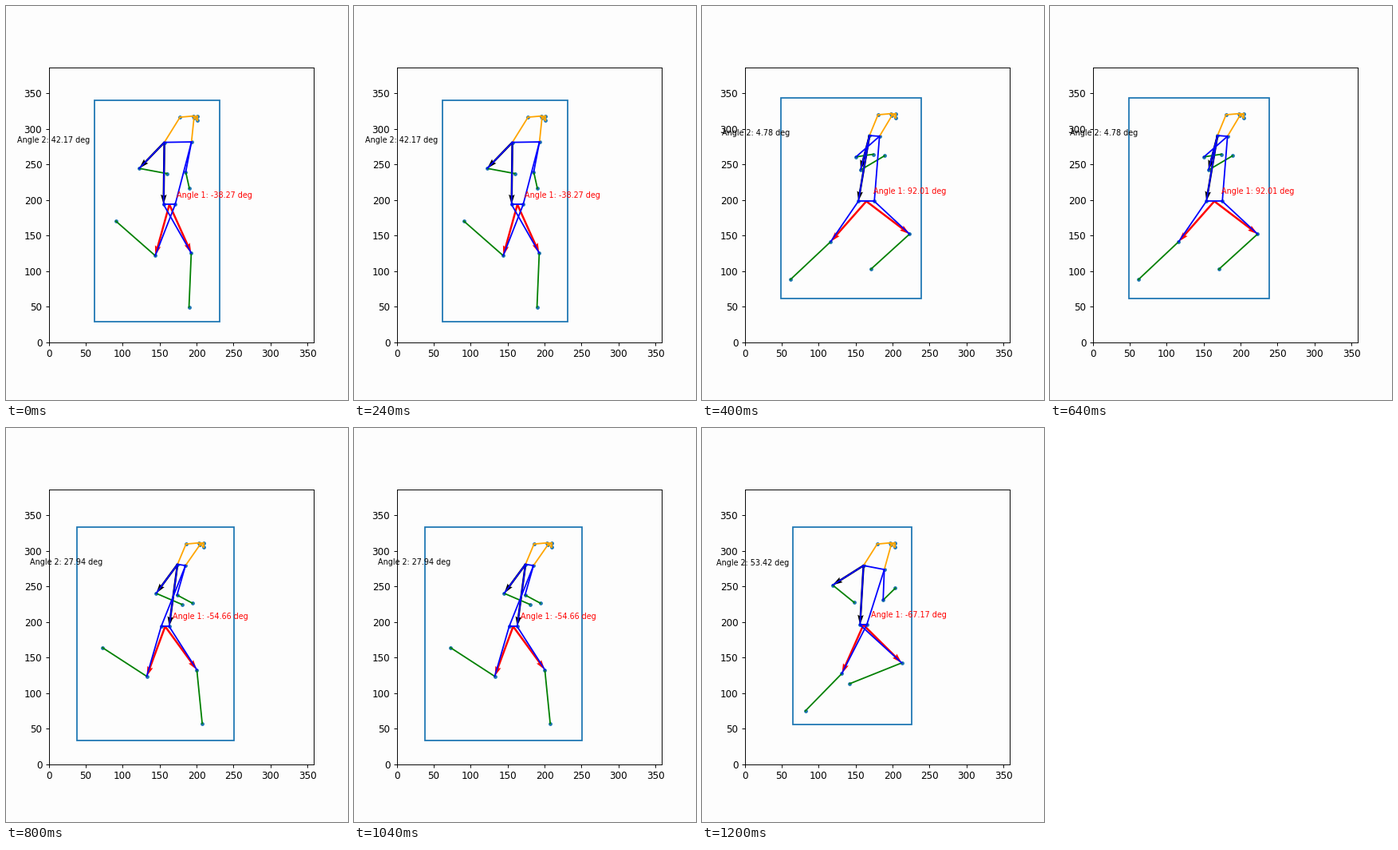
A matplotlib script that plays this animation: 429x493 px, repeating every 1600 ms.

```python
import matplotlib.pyplot as plt
import numpy as np
from matplotlib.animation import FuncAnimation
from matplotlib.patches import Rectangle

DPI = 86
BACKGROUND = "#fdfdfd"
plt.rcParams.update({"font.family": "DejaVu Sans", "font.size": 10})

# Body proportions, shared by every pose
THIGH, SHIN_A, SHIN_B = 74.5, 76, 72
UPPER_A, UPPER_B, FORE_A, FORE_B = 50, 43, 38, 23.5
HEAD = {"eye_a": (-6, 6), "eye_b": (0, 6), "ear_a": (-23.6, 4.4), "ear_b": (-4.7, 3.4)}
HEADROOM = 28.6

# Limb angles are in degrees from straight down, positive to the right.
# legs: angle between the thighs; arm: angle between torso and upper arm a
POSES = [
    dict(nose=(201.2, 312.2), sho_a=(156.4, 281.2), sho_b=(193.1, 281.8),
         pelvis=(163.2, 193.7), hips=15.7, thigh=23.4, legs=-38.27, arm=42.17,
         upper_b=-10.4, fore=(79, 12), shin=(-2.3, -132.4), box=(61.5, 230.8, 29.1)),
    dict(nose=(203.9, 315.6), sho_a=(168.8, 290.8), sho_b=(182.3, 289.7),
         pelvis=(164.5, 198.3), hips=21.6, thigh=-40.3, legs=92.01, arm=4.78,
         upper_b=-47.7, fore=(121.6, 99), shin=(-45.6, -46.6), box=(49.1, 238.4, 61.8)),
    dict(nose=(209.3, 305.4), sho_a=(174.2, 281.2), sho_b=(185, 279.5),
         pelvis=(157.5, 193.8), hips=-10.8, thigh=35.1, legs=-54.66, arm=27.94,
         upper_b=-15.4, fore=(65.9, 61), shin=(5.5, -124), box=(38.3, 250.8, 33.1)),
    dict(nose=(202.8, 305.4), sho_a=(160.7, 279.5), sho_b=(188.8, 273.9),
         pelvis=(160.5, 196), hips=9.1, thigh=44.1, legs=-67.17, arm=53.42,
         upper_b=-2.1, fore=(49.9, 135.5), shin=(-67.4, -43.2), box=(64.7, 226, 56.2)),
]

BONES = {
    "orange": ["nose eye_a", "nose eye_b", "eye_a eye_b", "eye_a ear_a",
               "eye_b ear_b", "ear_a sho_a", "ear_b sho_b"],
    "green": ["elb_a wri_a", "elb_b wri_b", "kne_a ank_a", "kne_b ank_b"],
    "blue": ["sho_a sho_b", "sho_a elb_a", "sho_b elb_b", "sho_a hip_a",
             "sho_b hip_b", "hip_a hip_b", "hip_a kne_a", "hip_b kne_b"],
}

fig = plt.figure(figsize=(429.01 / DPI, 493.01 / DPI), dpi=DPI, facecolor=BACKGROUND)
ax = fig.add_axes([0.125, 0.1468, 0.775, 0.6965])


def swing(start, length, degrees):
    turn = np.radians(degrees)
    return start + length * np.array([np.sin(turn), -np.cos(turn)])


def skeleton(pose):
    """Joint positions, built outwards from the torso."""
    nose, sho_a, sho_b, pelvis = (
        np.array(pose[key]) for key in ("nose", "sho_a", "sho_b", "pelvis"))
    j = {name: nose + offset for name, offset in HEAD.items()}
    j.update(nose=nose, sho_a=sho_a, sho_b=sho_b)

    half = np.array([pose["hips"] / 2, 0])
    j["hip_a"], j["hip_b"] = pelvis - half, pelvis + half
    j["kne_a"] = swing(pelvis, THIGH, pose["thigh"])
    j["kne_b"] = swing(pelvis, THIGH, pose["thigh"] + pose["legs"])
    j["ank_a"] = swing(j["kne_a"], SHIN_A, pose["shin"][0])
    j["ank_b"] = swing(j["kne_b"], SHIN_B, pose["shin"][1])

    dx, dy = j["hip_a"] - sho_a
    torso = np.degrees(np.arctan2(dx, -dy))
    j["elb_a"] = swing(sho_a, UPPER_A, torso - pose["arm"])
    j["elb_b"] = swing(sho_b, UPPER_B, pose["upper_b"])
    j["wri_a"] = swing(j["elb_a"], FORE_A, pose["fore"][0])
    j["wri_b"] = swing(j["elb_b"], FORE_B, pose["fore"][1])
    return j


def arrow(start, end, color):
    ax.quiver(*start, *(end - start), color=color, angles="xy",
              scale_units="xy", scale=1)


def label(pos, name, degrees, color):
    ax.text(*pos, f"{name}: {degrees:.2f} deg", color=color, size=8.1)


def draw(i):
    ax.clear()
    ax.set_facecolor(BACKGROUND)
    ax.set(xlim=(0, 358.6), ylim=(0, 386.2),
           xticks=range(0, 351, 50), yticks=range(0, 351, 50))

    pose = POSES[i]
    joints = skeleton(pose)
    ax.scatter(*np.array(list(joints.values())).T, s=9, color="C0")

    for color, bones in BONES.items():
        for bone in bones:
            ends = np.array([joints[name] for name in bone.split()])
            ax.plot(*ends.T, color=color, lw=1.5)

    left, right, bottom = pose["box"]
    top = pose["nose"][1] + HEADROOM
    ax.add_patch(Rectangle((left, bottom), right - left, top - bottom,
                           fill=False, ec="C0", lw=1.5, zorder=2))

    pelvis, shoulder = np.array(pose["pelvis"]), joints["sho_a"]
    for knee in ("kne_a", "kne_b"):
        arrow(pelvis, joints[knee], "red")
    for name in ("elb_a", "hip_a"):
        arrow(shoulder, joints[name], "black")

    label(pelvis + 10, "Angle 1", pose["legs"], "red")
    label(shoulder - (199.5, 0), "Angle 2", pose["arm"], "black")
    return []


anim = FuncAnimation(fig, draw, frames=len(POSES), init_func=lambda: [],
                     interval=400, repeat=True, repeat_delay=0)
plt.show()
```
